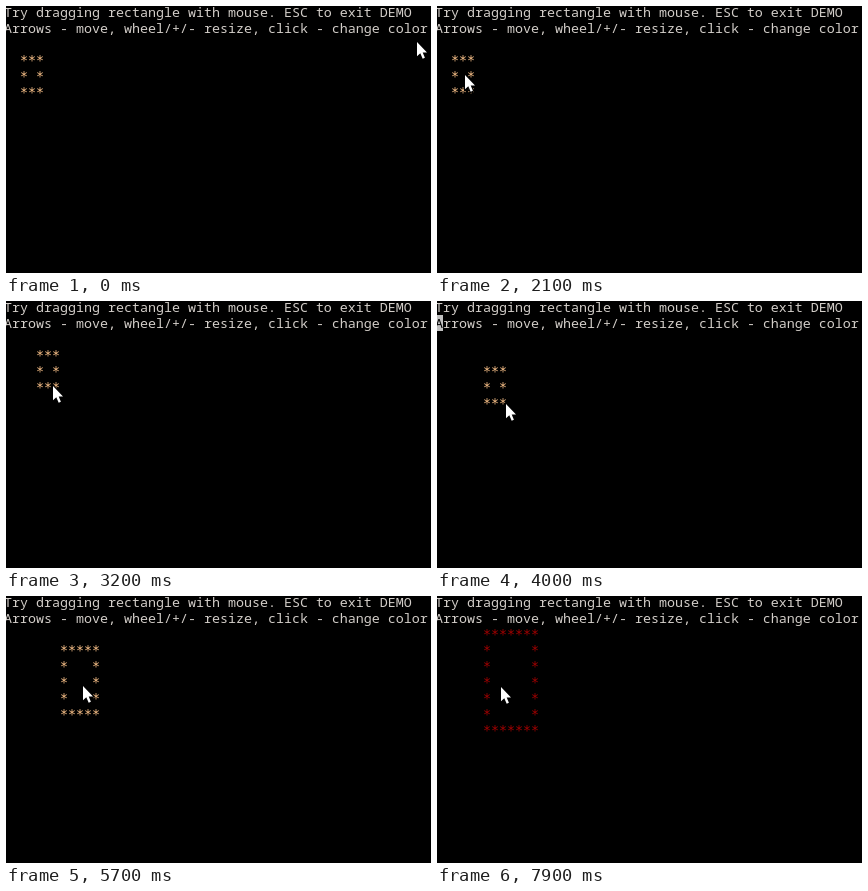
Recreate the animation shown at these times as an HTML page. Size 425x267 px, loop 8000 ms.

```html
<!DOCTYPE html>
<html lang="en">
<head>
<meta charset="utf-8">
<title>Console rectangle demo</title>
<style>
  html, body { margin: 0; width: 100%; height: 100%; overflow: hidden; background: #000; }
  #stage { position: relative; width: 425px; height: 267px; overflow: hidden; background: #000; }
  pre, #caret, #mouse { position: absolute; left: 0; top: 0; margin: 0; }
  pre, #caret { font: 13.333px/16px "Noto Sans Mono", "DejaVu Sans Mono", monospace; font-variant-ligatures: none; }
  #help { left: -2px; top: -2px; color: #d2cdc8; }
  #rect { font-family: "DejaVu Sans Mono", monospace; font-size: 13.29px; }
  #caret { left: -2px; top: 14px; width: 8px; height: 16px; background: #c0c0c0; color: #000; }
  #mouse { overflow: visible; }
</style>
</head>
<body>
<div id="stage">
  <pre id="help">Try dragging rectangle with mouse. ESC to exit DEMO
Arrows - move, wheel/+/- resize, click - change color</pre>
  <pre id="rect"></pre>
  <div id="caret">A</div>
  <svg id="mouse" width="12" height="19">
    <path d="M0 0V14.2L3.3 11.3L5.7 16.8L7.9 15.8L5.7 10.6H10Z" fill="#fff" stroke="#000" stroke-width="2" paint-order="stroke"/>
  </svg>
</div>
<script>
const LOOP = 8000, TICK = 100, CELL_W = 8, CELL_H = 16, ORIGIN = -2;
const BLINK = 486, FIRST_BLINK = 1565;
const $ = id => document.getElementById(id);

// Pointer strokes: bow sags the line downwards, power above 1 eases out.
const home = { x: 411, y: 36 };
const strokes = [
  { from: 0, to: 300, x: 186, y: 83 },
  { from: 400, to: 1000, x: 28, y: 69, bow: 17 },
  { from: 2300, to: 3800, x: 59, y: 96 },
  { from: 3900, to: 4500, x: 83, y: 104, bow: 4, power: 3 },
  { from: 4600, to: 4900, x: 47, y: 73 },
  { from: 4900, to: 5300, x: 77, y: 90 },
  { from: 7200, to: 7900, x: 64, y: 91 }
];

// Redraw times; each drag moves one column, each wheel turn adds a ring.
const drags = [2750, 3150, 3550, 3950, 4150, 4350];
const wheels = [5650, 6150];
const click = 7050;
const redraws = [...drags, ...wheels, click];

const count = (times, t) => times.filter(at => at <= t).length;

function pointer(t) {
  let { x, y } = home;
  for (const s of strokes) {
    const u = Math.min(1, Math.max(0, (t - s.from) / (s.to - s.from)));
    const k = 1 - (1 - u) ** (s.power || 1);
    x += (s.x - x) * k;
    y += (s.y - y) * k + (s.bow || 0) * Math.sin(Math.PI * k);
    if (u < 1) break;
  }
  return [Math.round(x), Math.round(y)];
}

function box(t) {
  const moved = count(drags, t), rings = count(wheels, t);
  return {
    col: 2 + moved - rings,
    row: (moved < 3 ? 3 : 4) - rings,
    size: 3 + 2 * rings
  };
}

function outline(n) {
  const edge = "*".repeat(n), side = "*" + " ".repeat(n - 2) + "*";
  return [edge, ...Array(n - 2).fill(side), edge].join("\n");
}

// A steady timer flips the caret; every redraw hides it.
function caretOn(t) {
  const flips = at => Math.max(0, Math.floor((at - FIRST_BLINK) / BLINK) + 1);
  const hidden = Math.max(0, ...redraws.filter(at => at <= t));
  return (flips(t) - flips(hidden)) % 2 === 1;
}

function draw(t) {
  const [x, y] = pointer(t);
  $("mouse").style.transform = `translate(${x}px, ${y}px)`;

  const { col, row, size } = box(t), rect = $("rect");
  rect.textContent = outline(size);
  rect.style.left = ORIGIN + col * CELL_W + "px";
  rect.style.top = ORIGIN + 1 + row * CELL_H + "px";
  rect.style.color = t < click ? "#f8c088" : "#a00000";

  $("caret").style.visibility = caretOn(t) ? "visible" : "hidden";
}

const start = performance.now();
let last = -1;
function frame() {
  const t = Math.floor((performance.now() - start) % LOOP / TICK) * TICK;
  if (t !== last) draw(last = t);
  requestAnimationFrame(frame);
}
draw(0);
requestAnimationFrame(frame);
</script>
</body>
</html>
```
